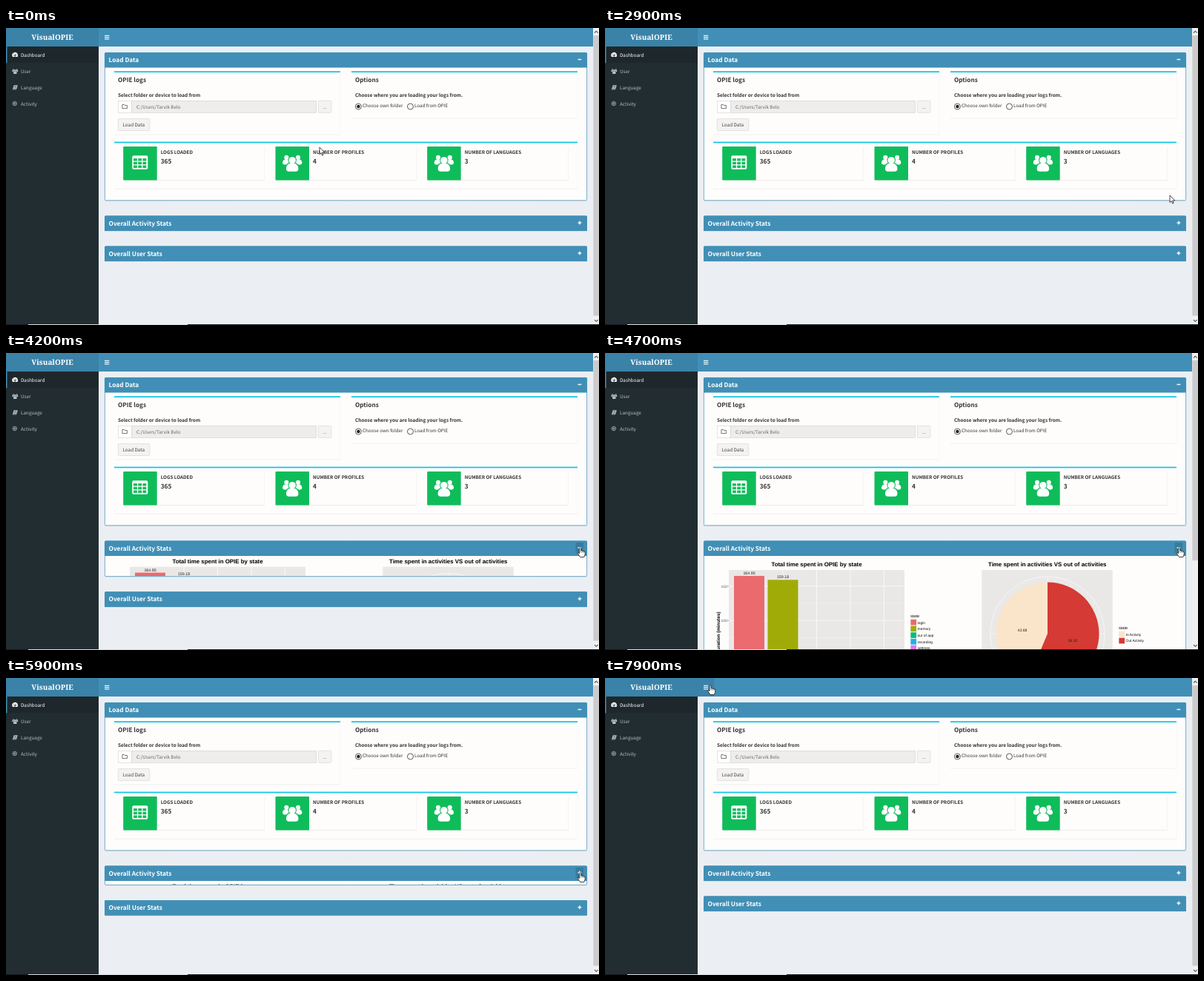
Animation, 800 px wide and 401 px high, one loop 8000 ms. Source, as an HTML page with a canvas:

```html
<!DOCTYPE html>
<html lang="en">
<head>
<meta charset="utf-8">
<title>VisualOPIE dashboard</title>
<style>
html, body { margin: 0; width: 100%; height: 100%; overflow: hidden; background: #ebeff4; }
canvas { display: block; width: 800px; height: 401px; }
</style>
</head>
<body>
<canvas id="stage"></canvas>
<script>
const W = 800, H = 401, LOOP = 8000, STEP = 100;
const canvas = document.getElementById('stage');
const c = canvas.getContext('2d');
const dpr = window.devicePixelRatio || 1;
canvas.width = Math.round(W * dpr);
canvas.height = Math.round(H * dpr);

const SANS = '"Noto Sans CJK JP", "Noto Sans CJK SC", "Noto Sans CJK", "Open Sans", sans-serif';
const ARIAL = '"Liberation Sans", Arial, sans-serif';
const SERIF = '"Noto Serif", serif';
const BLUE = '#418fb6', DARK_BLUE = '#3a82a8', CYAN = '#10c3e6', GREEN = '#0fbc5a';
const PAPER = '#fefdfc', INK = '#333';
const BODY_H = 212, BODY_TOP = 274, SLIDE = 500, OPEN_AT = 4082, CLOSE_AT = 5452;

function rect(x, y, w, h, fill) {
  c.fillStyle = fill;
  c.fillRect(x, y, w, h);
}

function round(x, y, w, h, r, fill, stroke) {
  c.beginPath();
  c.roundRect(x, y, w, h, r);
  if (fill) { c.fillStyle = fill; c.fill(); }
  if (stroke) { c.strokeStyle = stroke; c.lineWidth = 0.7; c.stroke(); }
}

function disc(x, y, r, fill) {
  c.beginPath();
  c.arc(x, y, r, 0, 7);
  c.fillStyle = fill;
  c.fill();
}

function ring(x, y, r, stroke, width) {
  c.beginPath();
  c.arc(x, y, r, 0, 7);
  c.strokeStyle = stroke;
  c.lineWidth = width;
  c.stroke();
}

function line(x1, y1, x2, y2, stroke, width) {
  c.beginPath();
  c.moveTo(x1, y1);
  c.lineTo(x2, y2);
  c.strokeStyle = stroke;
  c.lineWidth = width;
  c.stroke();
}

function poly(points) {
  c.beginPath();
  points.forEach(([x, y]) => c.lineTo(x, y));
  c.closePath();
}

// cy is the middle of the capital letters
function text(s, x, cy, size, { color = INK, bold = false, align = 'left', font = SANS } = {}) {
  c.font = `${bold ? 'bold ' : ''}${size}px ${font}`;
  c.fillStyle = color;
  c.textAlign = align;
  c.fillText(s, x, cy + size * 0.366);
}

function at(x, y, scale, draw) {
  c.save();
  c.translate(x, y);
  c.scale(scale, scale);
  draw();
  c.restore();
}

function person(x, y, r, fill) {
  disc(x, y, r, fill);
  c.beginPath();
  c.roundRect(x - r * 1.75, y + r * 0.8, r * 3.5, r * 2.4, [r * 1.5, r * 1.5, r * 0.8, r * 0.8]);
  c.fill();
}

function users(fill, back) {
  person(-8, -7.6, 3.1, fill);
  person(8, -7.6, 3.1, fill);
  disc(0, -3.6, 5.8, back);
  c.beginPath();
  c.roundRect(-9, 0, 18, 13, 5);
  c.fill();
  person(0, -3.6, 4.8, fill);
}

function tableIcon(x, y) {
  round(x, y, 21, 18.5, 1.8, '#fff');
  for (let row = 0; row < 3; row++)
    for (let col = 0; col < 3; col++)
      rect(x + 1.7 + col * 6.2, y + 3.8 + row * 4.7, 4.9, 3.4, GREEN);
}

function gauge(x, y) {
  c.beginPath();
  c.arc(x, y + 0.6, 3.9, Math.PI * 0.82, Math.PI * 2.18);
  c.closePath();
  c.fillStyle = '#fff';
  c.fill();
  line(x, y + 1.5, x + 1, y - 1.6, '#1e282c', 0.8);
  disc(x, y + 1.4, 1, '#1e282c');
  disc(x - 2.3, y + 0.6, 0.5, '#1e282c');
  disc(x + 2.3, y + 0.6, 0.5, '#1e282c');
  disc(x - 1.4, y - 1.3, 0.5, '#1e282c');
}

function book(x, y, fill) {
  poly([[x - 1.5, y - 3], [x + 3.6, y - 3], [x + 1.8, y + 3], [x - 3.5, y + 3]]);
  c.fillStyle = fill;
  c.fill();
  line(x - 0.6, y - 1.4, x + 1.9, y - 1.4, '#222d32', 0.5);
  line(x - 1, y - 0.2, x + 1.5, y - 0.2, '#222d32', 0.5);
  line(x - 2.6, y + 2, x + 1.6, y + 2, '#222d32', 0.5);
}

function folder(x, y) {
  poly([[x - 3.3, y - 2.5], [x - 0.8, y - 2.5], [x, y - 1.6], [x + 3.2, y - 1.6], [x + 3.2, y + 2.6], [x - 3.3, y + 2.6]]);
  c.strokeStyle = '#555';
  c.lineWidth = 0.8;
  c.stroke();
}

function sidebar() {
  const gray = '#b3c0c6';
  rect(0, 25, 125, H - 25, '#222d32');
  rect(0, 25, 125, 22.3, '#1e282c');
  rect(0, 25, 1.5, 22.3, BLUE);
  ['Dashboard', 'User', 'Language', 'Activity'].forEach((s, i) =>
    text(s, 20, 36.2 + i * 22, 6.35, { color: i ? gray : '#fff' }));
  gauge(12.2, 36.2);
  at(12.3, 58.4, 0.3, () => users(gray, '#222d32'));
  book(12.2, 80.2, gray);
  ring(11.8, 102, 2.8, gray, 0.7);
  ring(11.8, 102, 1.4, gray, 0.6);
  disc(11.8, 102, 0.8, gray);
}

function topBar(hover) {
  rect(0, 0, W, 25, BLUE);
  rect(0, 0, 125, 25, DARK_BLUE);
  if (hover) rect(125, 0, 22.5, 25, DARK_BLUE);
  text('VisualOPIE', 62.5, 12.6, 10, { color: '#fff', bold: true, align: 'center', font: SERIF });
  for (let i = 0; i < 3; i++) rect(133, 9.8 + i * 2.3, 6.3, 1.1, '#fff');
}

function sign(y, plus, hover) {
  if (hover) rect(768.5, y - 7, 10.5, 14, 'rgba(0,0,0,.14)');
  rect(771.5, y - 0.7, 4.8, 1.4, '#fff');
  if (plus) rect(773.2, y - 2.4, 1.4, 4.8, '#fff');
}

function panel(title, y, body, plus, hover) {
  round(133, y, 651, 20.5 + body, 1.5, body > 0 ? PAPER : BLUE);
  if (body > 0) round(133.4, y + 0.4, 650.2, 19.9 + body, 1.5, null, BLUE);
  round(133, y, 651, 20.5, [1.5, 1.5, 0, 0], BLUE);
  rect(133, y + 20.5 + body, 651, 0.6, 'rgba(0,0,0,.1)');
  text(title, 138.5, y + 10, 8.3, { color: '#fff', bold: true });
  sign(y + 9.5, plus, hover);
}

function card(x, y, w, h) {
  rect(x, y, w, h, PAPER);
  rect(x, y, w, 1.7, CYAN);
  rect(x, y + h - 0.4, w, 0.8, '#eeeceb');
  rect(x + w - 0.2, y + 2, 0.5, h - 2, '#f1efee');
}

function stat(x, label, value) {
  rect(x, 160, 190.5, 45.5, PAPER);
  rect(x, 205.3, 190.5, 0.8, '#e9e7e6');
  rect(x + 190, 160, 0.6, 45.5, '#f0eeed');
  round(x, 160, 45.5, 45.5, [1, 0, 0, 1], GREEN);
  text(label, x + 50.5, 168, 6.3, { bold: true });
  text(value, x + 50.5, 179.5, 8.3, { bold: true });
}

function loadPanel() {
  panel('Load Data', 33, 179.5, false, false);
  card(146, 58.3, 305, 85.7);
  card(466, 58.3, 305, 63.7);
  card(146, 153.6, 625, 63.6);

  text('OPIE logs', 151, 69.8, 8.2, { bold: true });
  text('Select folder or device to load from', 151, 90.6, 6.47, { bold: true });
  rect(151, 98, 18.5, 16.5, '#fff');
  c.strokeStyle = '#d2d2d2';
  c.lineWidth = 0.6;
  c.strokeRect(151.3, 98.3, 18.4, 16);
  rect(169.5, 98, 249, 16.5, '#eeedec');
  c.strokeRect(169.8, 98.3, 248.6, 16);
  folder(160.2, 106);
  text('C:/Users/Tarvik Belo', 176, 106.2, 6.3, { color: '#666' });
  round(421.3, 98.3, 17.6, 16, 1, '#f4f3f2', '#d9d9d9');
  text('...', 430.1, 106.2, 6.3, { color: '#444', align: 'center' });
  round(151.3, 122.5, 42.4, 16, 1, '#f4f3f2', '#d9d9d9');
  text('Load Data', 172.3, 130.6, 6.35, { color: '#444', align: 'center' });

  text('Options', 471, 69.8, 8.2, { bold: true });
  text('Choose where you are loading your logs from.', 471, 90.6, 6.47, { bold: true });
  [475.4, 545.5].forEach((x, i) => {
    disc(x, 106, 4, '#fff');
    ring(x, 106, 4, '#333', 0.8);
    if (!i) disc(x, 106, 2.2, '#222');
  });
  text('Choose own folder', 481, 104.6, 6.25);
  text('Load from OPIE', 551, 104.6, 6.25);

  stat(158.2, 'LOGS LOADED', '365');
  stat(363.5, 'NUMBER OF PROFILES', '4');
  stat(568.2, 'NUMBER OF LANGUAGES', '3');
  tableIcon(170.3, 172.3);
  [386.2, 590.9].forEach(x => at(x, 182.2, 0.98, () => users('#fff', GREEN)));
}

function legend(x, y, entries) {
  text('state', x, y, 5.6, { color: '#111', font: ARIAL });
  entries.forEach(([name, color], i) => {
    const ky = y + 4.2 + i * 8.7;
    rect(x, ky, 8.4, 8.4, '#f0f0f0');
    rect(x + 0.4, ky + 0.4, 7.6, 7.6, color);
    text(name, x + 9.6, ky + 4.4, 4.9, { color: '#111', font: ARIAL });
  });
}

function barChart(top) {
  const x0 = 167, w = 237, y0 = top + 14, h = 170, zero = top + 175, unit = 0.928;
  const label = { color: '#222', align: 'center', font: ARIAL };
  const bars = [['login', 164.95, '#ea6a6e'], ['memory', 159.18, '#a1ab08'],
    ['out of app', 44.2, '#05bd79'], ['recording', 31.5, '#1fb0ee'], ['settings', 12.7, '#df76ec']];
  text('Total time spent in OPIE by state', 285.5, top + 6.6, 7.9, { color: '#000', bold: true, align: 'center', font: ARIAL });
  rect(x0, y0, w, h, '#e9e8e7');
  for (let v = 0; v < 180; v += 25) {
    const y = zero - v * unit;
    line(x0, y, x0 + w, y, '#fbfbfb', v % 50 ? 0.35 : 0.8);
    if (v % 50 === 0) {
      line(x0 - 1.8, y, x0, y, '#444', 0.6);
      text(v, x0 - 2.4, y, 4.8, { color: '#555', align: 'right', font: ARIAL });
    }
  }
  bars.forEach(([, v, color], i) => {
    const x = 194.5 + i * 45.5, y = zero - v * unit;
    line(x, y0, x, y0 + h, '#fbfbfb', 0.8);
    rect(x - 20.5, y, 41, v * unit, color);
    text(v.toFixed(v % 1 ? 2 : 0), x, y - 4, 5.3, label);
  });
  c.save();
  c.translate(152.2, top + 98.5);
  c.rotate(-Math.PI / 2);
  text('Duration (minutes)', 0, 0, 6.3, { color: '#000', bold: true, align: 'center', font: ARIAL });
  c.restore();
  legend(412, top + 76.2, bars.map(([name, , color]) => [name, color]));
}

function pieChart(top) {
  const x = 597, y = top + 100, r = 69.5, up = -Math.PI / 2;
  const inside = 43.68, turn = Math.PI * 2 * (1 - inside / 100);
  const parts = [['In Activity', '#fae5cb'], ['Out Activity', '#d53a34']];
  text('Time spent in activities VS out of activities', 596.7, top + 6.6, 7.9, { color: '#000', bold: true, align: 'center', font: ARIAL });
  rect(508.3, top + 14, 176.5, 170, '#e9e8e7');
  ring(x, y, 77, '#fafafa', 0.8);
  ring(x, y, 73, '#f4f4f4', 0.35);
  for (let i = 0; i < 4; i++) {
    const a = up + i * Math.PI / 2;
    line(x, y, x + 77 * Math.cos(a), y + 77 * Math.sin(a), '#fafafa', 0.6);
  }
  [[turn, Math.PI * 2, inside], [0, turn, 100 - inside]].forEach(([from, to, v], i) => {
    c.beginPath();
    c.moveTo(x, y);
    c.arc(x, y, r, up + from, up + to);
    c.fillStyle = parts[i][1];
    c.fill();
  });
  [[turn, Math.PI * 2, inside], [0, turn, 100 - inside]].forEach(([from, to, v]) => {
    const a = up + (from + to) / 2;
    text(v.toFixed(2), x + r / 2 * Math.cos(a), y + r / 2 * Math.sin(a) + 2, 5.1, { color: '#222', align: 'center', font: ARIAL });
  });
  legend(693, top + 92.4, parts);
}

function swing(t) {
  return 0.5 - Math.cos(Math.PI * Math.min(1, Math.max(0, t))) / 2;
}

function activityPanel(open, expanded, hover) {
  const h = BODY_H * open;
  panel('Overall Activity Stats', 253.5, h, !expanded, hover);
  if (h <= 0) return;
  c.save();
  c.beginPath();
  c.rect(134, BODY_TOP, 649, Math.max(0, h - 0.7));
  c.clip();
  const top = BODY_TOP + 5 * open;
  barChart(top);
  pieChart(top);
  c.restore();
}

function scrollbar(pageH) {
  rect(792, 0, 8, H, '#f0f0f0');
  rect(792.4, 10, 7.6, 378.5 * H / Math.max(H, pageH), '#cbcbcb');
  [[5.5, 1], [395, -1]].forEach(([y, d]) => {
    c.beginPath();
    c.moveTo(794, y + d);
    c.lineTo(796.3, y - d * 1.3);
    c.lineTo(798.6, y + d);
    c.strokeStyle = '#555';
    c.lineWidth = 1.1;
    c.stroke();
  });
}

// time, x, y of the pointer tip
const PATH = [[0, 423, 161], [800, 446, 211], [1600, 468, 251], [2200, 610, 244], [2900, 762, 226],
  [3500, 768, 244], [3900, 774.5, 262.5], [6100, 774.5, 262.5], [6900, 280, 37], [7500, 142, 9.5], [8000, 142, 9.5]];

function pointerAt(t) {
  const i = PATH.findIndex(p => p[0] > t);
  const [t0, x0, y0] = PATH[i - 1], [t1, x1, y1] = PATH[i];
  const k = swing((t - t0) / (t1 - t0));
  return [x0 + (x1 - x0) * k, y0 + (y1 - y0) * k];
}

function outline(width) {
  c.lineJoin = 'round';
  c.fillStyle = '#fff';
  c.strokeStyle = '#111';
  c.lineWidth = width;
  c.fill();
  c.stroke();
  c.lineJoin = 'miter';
}

function arrow() {
  poly([[0, 0], [0, 9.6], [2.2, 7.6], [3.7, 11], [5.2, 10.3], [3.7, 7], [6.8, 7]]);
  outline(0.75);
}

function hand() {
  c.beginPath();
  c.moveTo(-1, 8);
  c.lineTo(-1, 1);
  c.quadraticCurveTo(0, -0.7, 1.1, 1);
  c.lineTo(1.1, 4.4);
  c.quadraticCurveTo(2.4, 3.6, 3.1, 4.9);
  c.quadraticCurveTo(4.4, 4.2, 5, 5.4);
  c.quadraticCurveTo(6.7, 5, 6.8, 6.8);
  c.lineTo(6.6, 10);
  c.lineTo(5.4, 13);
  c.lineTo(0, 13);
  c.lineTo(-3.3, 8.2);
  c.quadraticCurveTo(-3, 6.2, -1, 8);
  c.closePath();
  outline(0.8);
  [1.1, 3.1, 5].forEach((x, i) => line(x, 4.5 + i * 0.5, x, 7.2, '#111', 0.5));
}

function draw(t) {
  const expanded = t >= OPEN_AT && t < CLOSE_AT;
  const open = swing((t - OPEN_AT) / SLIDE) - swing((t - CLOSE_AT) / SLIDE);
  const shift = BODY_H * open;
  const [x, y] = pointerAt(t);
  const onSign = x > 768 && x < 780 && y > 255 && y < 271;
  const onMenu = x > 125 && x < 147.5 && y < 25;

  c.setTransform(dpr, 0, 0, dpr, 0, 0);
  c.textRendering = 'geometricPrecision';
  rect(0, 0, W, H, '#ebeff4');
  sidebar();
  topBar(onMenu);
  loadPanel();
  activityPanel(open, expanded, onSign);
  panel('Overall User Stats', 294.5 + shift, 0, true, false);
  scrollbar(350 + shift);
  rect(0, 400, W, 1, '#15191c');
  rect(30, 400, 215, 1, '#d9dcde');
  at(x, y, 1, onSign || onMenu ? hand : arrow);
}

function frame(now) {
  draw(Math.floor(now % LOOP / STEP) * STEP);
  requestAnimationFrame(frame);
}
requestAnimationFrame(frame);
</script>
</body>
</html>
```
